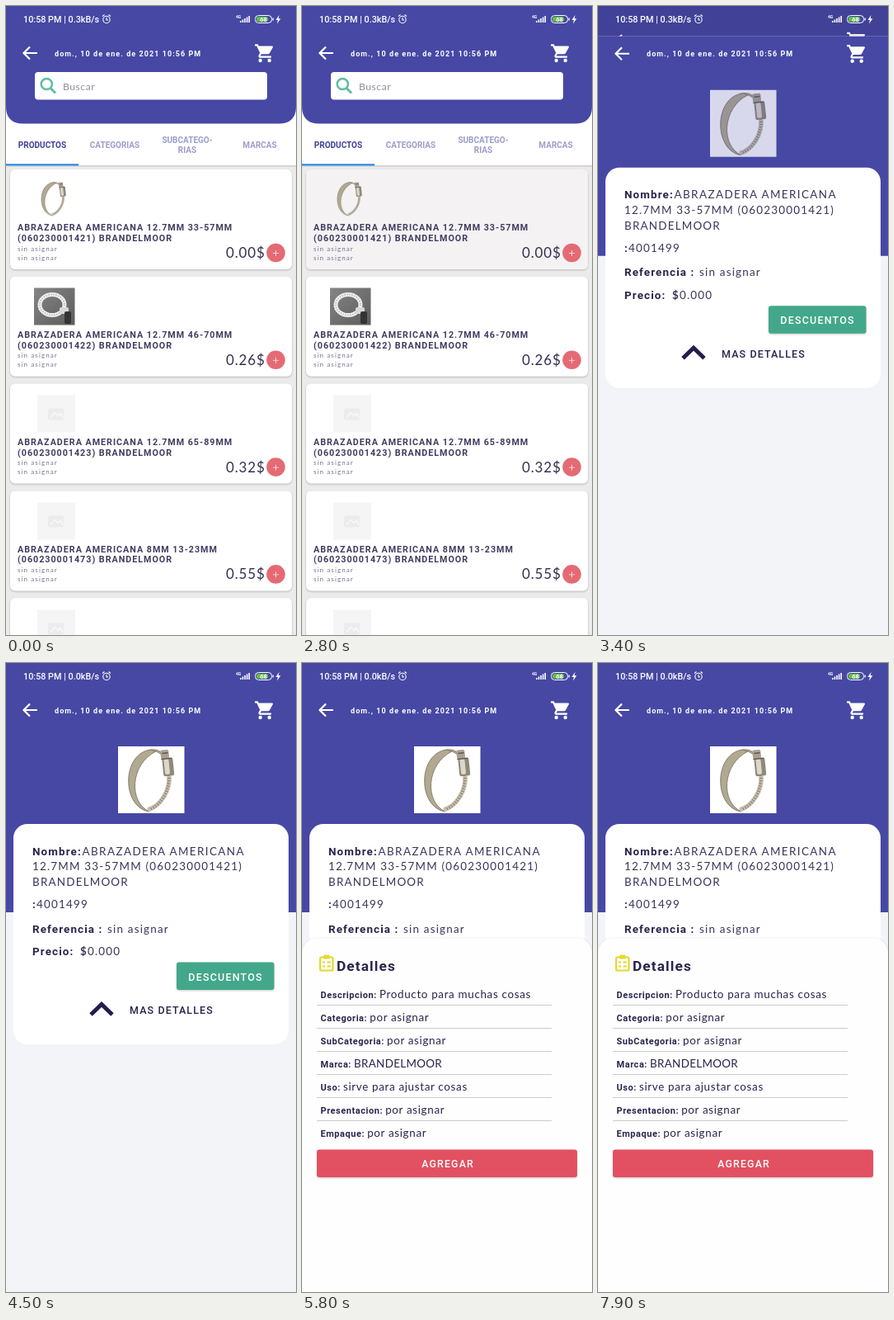
An HTML page for the animation above (8000 ms loop, 352x762 px).

```html
<!DOCTYPE html>
<html lang="es">
<head>
<meta charset="utf-8">
<title>Productos</title>
<style>
html, body { margin: 0; width: 100%; height: 100%; overflow: hidden; background: #f3f4f7; }
svg { display: block; width: 352px; height: 762px; }
text { white-space: pre; }
.b { font-family: Roboto, sans-serif; font-weight: 700; }
.m { font-family: Roboto, sans-serif; font-weight: 500; }
.l { font-family: Lato, 'Open Sans', sans-serif; }
.card { filter: drop-shadow(0 1px 1px rgba(0,0,0,.22)); }
.sheet { filter: drop-shadow(0 0 1px rgba(0,0,0,.1)); }
</style>
</head>
<body>
<svg id="stage" viewBox="0 0 352 762" xmlns="http://www.w3.org/2000/svg"></svg>
<script>
const LOOP = 8000, STEP = 100, H = 762;
const BLUE = '#4648a4', INK = '#28254c', BRAND = 'BRANDELMOOR';

const text = (x, y, cls, size, gap, fill, s, extra = '') =>
  `<text x="${x}" y="${y}" class="${cls}" font-size="${size}" letter-spacing="${gap}" fill="${fill}" ${extra}>${s}</text>`;
const mid = (x, y, cls, size, gap, fill, s) =>
  text(x + gap / 2, y, cls, size, gap, fill, s, 'text-anchor="middle"');
const rect = (x, y, w, h, r, fill, extra = '') =>
  `<rect x="${x}" y="${y}" width="${w}" height="${h}" rx="${r}" fill="${fill}" ${extra}/>`;
const line = (d, stroke, w, extra = '') =>
  `<path d="${d}" fill="none" stroke="${stroke}" stroke-width="${w}" ${extra}/>`;

const clamp = `
  ${line('M36 6C54 0 64 20 61 42', '#a39b87', 3)}
  <path d="M40 4C4 8 4 74 38 79C13 68 14 22 46 6Z" fill="#b1a992" stroke="#7d7564" stroke-width=".9"/>
  ${line('M62 36C63 54 52 72 36 77', '#c6bfad', 5.5)}
  ${line('M62 38C62 54 52 71 39 76', '#8b8372', 3.5, 'stroke-dasharray="1.200 2"')}
  <g transform="rotate(-6 59 22)">
    ${rect(53, 4, 10, 11, 2, '#aaa293')}${rect(54, 14, 13, 22, 2, '#8f8778')}
    ${rect(56, 15, 6, 19, 2, '#dcd7cb')}${line('M53 15H66M55 8H62', '#5f594e', 1.3)}
  </g>`;

const ringPhoto = `
  ${rect(34, 341.5, 49.5, 45, 0, 'url(#steel)')}
  <ellipse cx="56" cy="362" rx="15" ry="12.500" fill="none" stroke="#efefef" stroke-width="5"/>
  <ellipse cx="56" cy="362" rx="15" ry="12.500" fill="none" stroke="#aaa" stroke-width="2" stroke-dasharray="1 2"/>
  ${rect(65, 365, 11, 8, 2, '#d8d8d8')}${rect(71, 370, 8, 15, 2, '#333')}`;

const blankPhoto = y => rect(38, y, 46, 45, 0, '#f5f5f5') + rect(51, y + 16, 19, 14, 2, '#ececec') +
  line(`M54 ${y + 27}l5 -6l4 4l3 -3l3 5`, '#f8f8f8', 1.5);

const status = `
  ${text(21, 20, 'm', 10.8, 0, '#fff', '10:58 PM | <tspan id="speed"></tspan>')}
  <g fill="none" stroke="#fff" stroke-width="1.100">
    <circle cx="122" cy="16.500" r="4.200"/>
    <path d="M122 14v3h2M117 12.500l2.500 -2M127 12.500l-2.500 -2"/>
  </g>
  ${text(279, 14.5, 'b', 5, 0, '#fff', '4G')}
  <path d="M284 20v-2h1.600v2zM286.600 20v-3.500h1.600v3.500zM289.200 20v-5h1.600v5zM291.800 20v-6.500h1.600v6.500zM294.400 20v-8h1.600v8z" fill="#fff"/>
  ${rect(302.5, 11.5, 20, 9, 4, BLUE, 'stroke="#fff"')}
  ${rect(304, 13, 14, 6, 2.5, '#62c044')}
  ${rect(323.4, 14.5, 1.4, 3, .5, '#fff')}
  ${mid(312.5, 18.8, 'b', 7.5, 0, '#fff', '68')}
  <path d="M331.500 11l-4 6h2.500l-1 4.500l4.300 -6.200h-2.600z" fill="#fff"/>`;

const bar = `
  ${line('M38 57H22M29 49.500L21.500 57L29 64.500', '#fff', 2.2)}
  ${text(59, 60.6, 'b', 9, 1.05, '#fff', 'dom., 10 de ene. de 2021 10:56 PM')}
  <g transform="translate(301 44) scale(1.100)" fill="#fff">
    <path d="M1 2H4.300L5.200 4H20Q21.500 4.200 20.700 5.600L17.200 12Q16.600 13 15.500 13H8.100L7 15H19V17H7Q4.200 16.800 5.200 14.100L6.600 11.600L3 4H1Z"/>
    <circle cx="7" cy="20" r="2"/><circle cx="17" cy="20" r="2"/>
  </g>`;

const items = [
  ['12.7MM 33-57MM', 1421, '0.00$'],
  ['12.7MM 46-70MM', 1422, '0.26$'],
  ['12.7MM 65-89MM', 1423, '0.32$'],
  ['8MM 13-23MM', 1473, '0.55$']
];

const item = ([size, code, price], i) => {
  const title = (y, s) => text(14, y, 'b', 10.75, .97, '#403d60', s);
  const note = y => text(14, y, 'l', 8, 1.1, '#77748c', 'sin asignar');
  return `<g transform="translate(0 ${i * 129.8})">
    ${rect(5, 198, 342, 121, 6, '#fff', 'class="card"')}
    ${i ? '' : rect(5, 198, 342, 121, 6, '#f4f2f3', 'id="press"')}
    ${title(272.3, 'ABRAZADERA AMERICANA ' + size)}
    ${title(285, `(06023000${code}) ${BRAND}`)}
    ${note(296.7)}${note(307.7)}
    ${text(267, 305, 'l', 17, .85, '#34314f', price)}
    <circle cx="327.500" cy="299" r="11.300" fill="#e46a74"/>
    ${line('M324 299.500H331M327.500 296V303', '#f9d3d6', 1)}
  </g>`;
};

const tab = (x, y, s, on) => mid(x, y, 'b', 10, 0, on ? '#41419a' : '#9d9dcb', s);

const list = `
  ${rect(0, 0, 352, 800, 0, '#ebebec')}
  ${rect(0, 120, 352, 73, 0, '#fff')}
  ${rect(0, 193, 352, 1.6, 0, '#cfcfd2')}
  <path d="M0 0H352V122Q352 142.500 331 142.500H21Q0 142.500 0 122Z" fill="${BLUE}"/>
  ${bar}
  ${rect(35, 80, 282, 33.5, 4, '#fff')}
  ${line('M54 99.500L60 105.500', '#5fbd9f', 3)}
  <circle cx="49.300" cy="94.500" r="6.600" fill="none" stroke="#5fbd9f" stroke-width="2.500"/>
  ${text(69, 101.5, 'l', 12.2, .5, '#8f8f9f', 'Buscar')}
  ${tab(44, 172, 'PRODUCTOS', true)}${tab(132, 172, 'CATEGORIAS')}
  ${tab(220, 166, 'SUBCATEGO-')}${tab(220, 178, 'RIAS')}${tab(308, 172, 'MARCAS')}
  ${rect(0, 191.3, 88, 2, 0, '#2382e4')}
  ${items.map(item).join('')}
  ${rect(5, 717.2, 342, 121, 6, '#fff', 'class="card"')}
  <g transform="translate(36 211.400) scale(.54)">${clamp}</g>
  ${ringPhoto}
  ${[471.5, 601.5, 731.5].map(blankPhoto).join('')}`;

const bold = (y, s) => text(32, y, 'b', 13.44, 1.1, INK, s);
const plain = (x, y, s, gap = 1.2) => text(x, y, 'l', 13.44, gap, '#39365a', s);

const detail = `
  ${rect(0, 0, 352, 800, 0, '#f3f4f7')}
  ${rect(0, -40, 352, 342, 0, BLUE)}
  ${bar}
  <g id="photo" transform="translate(136 101)">${rect(0, 0, 80.5, 81, 0, '#fff')}${clamp}</g>
  ${rect(9, 195, 334, 267, 17, '#fff')}
  ${bold(232.6, 'Nombre:')}${plain(92.5, 232.6, 'ABRAZADERA AMERICANA', 1.4)}
  ${plain(32, 251.2, '12.7MM 33-57MM (060230001421)')}
  ${plain(32, 269.8, BRAND)}
  ${bold(297.2, ':')}${plain(37, 297.2, '4001499')}
  ${bold(326.6, 'Referencia :')}${plain(123, 326.6, 'sin asignar')}
  ${bold(354.2, 'Precio:')}${plain(90, 354.2, '<tspan font-weight="700">$</tspan>0.000')}
  ${rect(207, 362.5, 118.5, 33.5, 3, '#43a88b', 'class="card"')}
  ${mid(266, 384.6, 'm', 12.5, 1.2, '#fff', 'DESCUENTOS')}
  ${line('M103 426L116 413.500L129 426', '#221e4d', 5)}
  ${text(150, 425, 'm', 12.5, 1.1, INK, 'MAS DETALLES')}`;

const rows = [
  ['Descripcion', 'Producto para muchas cosas'],
  ['Categoria', 'por asignar'],
  ['SubCategoria', 'por asignar'],
  ['Marca', BRAND],
  ['Uso', 'sirve para ajustar cosas'],
  ['Presentacion', 'por asignar'],
  ['Empaque', 'por asignar']
];

const row = ([label, value], i) => {
  const y = 70.5 + i * 28;
  const gap = value === BRAND ? .3 : .65;
  return text(22.5, y, 'b', 11, .55, INK,
      `${label}:<tspan dx="3" class="l" font-weight="400" font-size="13.44" letter-spacing="${gap}">${value}</tspan>`) +
    (i < 6 ? rect(18, y + 8.5, 285, 1, 0, '#cbcbd0') : '');
};

const sheet = `
  ${rect(0, -1.6, 352, 473.6, 18, '#fefefe', 'class="sheet"')}
  <g fill="none" stroke="#e2da2c" stroke-width="2.200">
    <rect x="22" y="21.500" width="15.500" height="16" rx="1.500"/>
    <path d="M25 27.500h3M25 32.500h3M30.500 27.500h4.500M30.500 32.500h4.500"/>
  </g>
  ${rect(26, 18.5, 7.5, 5, 1.5, '#e2da2c')}
  ${text(42, 37.7, 'b', 17.3, 1.1, INK, 'Detalles')}
  ${rows.map(row).join('')}
  ${rect(18, 254.5, 316, 33.5, 3, '#e25161', 'class="card"')}
  ${mid(176.5, 276, 'm', 12.3, 1.2, '#fff', 'AGREGAR')}`;

document.getElementById('stage').innerHTML = `
  <defs>
    <linearGradient id="steel" x2="1" y2="1"><stop stop-color="#858585"/><stop offset="1" stop-color="#5c5c5c"/></linearGradient>
    <clipPath id="reveal"><rect id="window" width="352" height="${H}"/></clipPath>
  </defs>
  <g id="list">${list}</g>
  ${rect(0, 0, 352, H, 0, '#000', 'id="shade"')}
  <g id="detail" clip-path="url(#reveal)"><g id="page">${detail}</g></g>
  <g id="sheet">${sheet}</g>
  ${status}`;

const el = {};
document.querySelectorAll('[id]').forEach(e => el[e.id] = e);
const set = (e, k, v) => e.setAttribute(k, v);
const show = (e, on) => set(e, 'display', on ? 'inline' : 'none');
const moveY = (e, y) => set(e, 'transform', `translate(0 ${y.toFixed(2)})`);
const unit = v => Math.max(0, Math.min(1, v));

// cubic-bezier(.35, .45, 0, 1)
function ease(x) {
  let lo = 0, hi = 1, s = .5;
  for (let i = 0; i < 24; i++) {
    s = (lo + hi) / 2;
    if (3 * (1 - s) ** 2 * s * .35 + s ** 3 < x) lo = s; else hi = s;
  }
  return 3 * (1 - s) ** 2 * s * .45 + 3 * (1 - s) * s * s + s ** 3;
}

// overdamped spring while opening, then a drag back down
function sheetY(t) {
  const spring = 474 * Math.exp(-2.45 * (Math.min(t, 7200) - 4870) / 1000);
  return Math.round(286.4 + spring + 47 * Math.max(0, (t - 7400) / 500) ** 2);
}

function draw(t) {
  const p = t < 3152 ? 0 : ease(unit((t - 3152) / 425));
  set(el.press, 'opacity', unit((t - 2400) / 400));
  show(el.list, p < 1);
  moveY(el.list, -.02 * H * p);
  set(el.shade, 'opacity', .08 * unit(p / .36));
  show(el.detail, p > 0);
  set(el.window, 'y', H * (1 - p));
  moveY(el.page, .02 * H * (1 - p));
  set(el.photo, 'opacity', unit((t - 3250) / 190));
  show(el.sheet, t >= 4900);
  moveY(el.sheet, sheetY(t));
  el.speed.textContent = t < 4000 ? '0.3kB/s' : '0.0kB/s';
}

const start = performance.now();
function tick() {
  const t = (performance.now() - start) % LOOP;
  draw(Math.floor(t / STEP) * STEP);
  requestAnimationFrame(tick);
}
tick();
</script>
</body>
</html>
```
